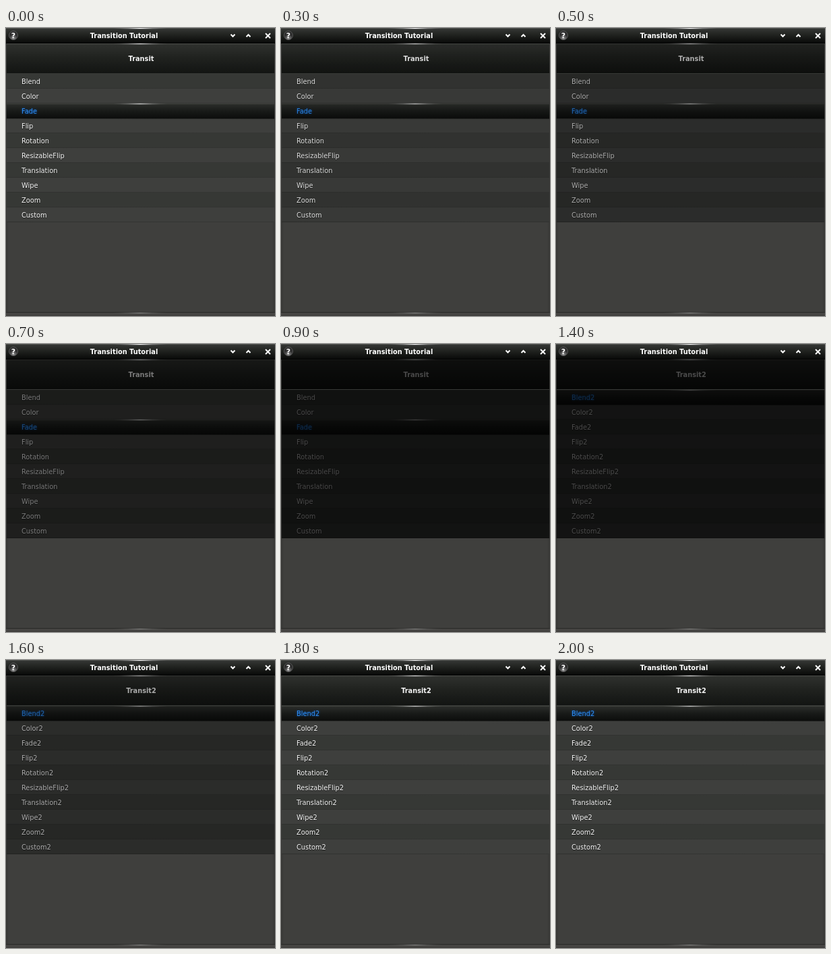
Animation of 399 by 427 pixels, one loop 2300 ms. Source, as an HTML page:

```html
<!DOCTYPE html>
<html lang="en">
<head>
<meta charset="utf-8">
<title>Transition Tutorial</title>
<style>
html, body { margin: 0; width: 100%; height: 100%; overflow: hidden; background: #3f3f3d; }
body { position: relative; font: 9.8px "DejaVu Sans", sans-serif; color: #f4f4f4; }
div, svg { position: absolute; box-sizing: border-box; }
#stage { inset: 0; width: 399px; height: 427px; overflow: hidden;
  background: linear-gradient(90deg, #353533, #3f3f3d 4px 395px, #353533); }
.title { left: 0; top: 0; width: 399px; height: 23px; line-height: 22px; padding-right: 49px;
  font-weight: bold; text-align: center; color: #fff;
  background: linear-gradient(#343634, #20221f 45%, #090a09);
  border-top: 1px solid #50524f; border-bottom: 1px solid #030303; }
.page { left: 1px; top: 23px; width: 397px; height: 265px; }
.header { left: 0; top: 0; width: 100%; height: 45px; line-height: 43px;
  font-weight: bold; text-align: center; padding-left: 2px;
  background: linear-gradient(#2f312e, #20221f 45%, #121412); border-top: 1px solid #4b4d49; }
.row { left: 0; width: 100%; height: 22px; line-height: 24px; padding-left: 22px;
  background: #3e3f3d; text-shadow: 0 1px 1px #0008; }
.row.dark { background: #363835; }
.row::after { content: ""; position: absolute; left: 0; bottom: 0; width: 100%; height: 1px;
  background: linear-gradient(90deg, #30312f, #30312f88); }
.row.on { z-index: 1; height: 23px; line-height: 22px; color: #2f8ff5; text-shadow: 0 0 3px #0a58b8;
  background: linear-gradient(#2b2d2a, #171917 50%, #0b0c0b); border-top: 1px solid #40423e; }
.glow { z-index: 2; left: 159px; width: 80px; height: 3px;
  background: radial-gradient(closest-side, #fff, #aaa8 45%, #0000); }
#shade { z-index: 3; left: 1px; top: 23px; width: 397px; height: 265px; background: #000; }
.rule { z-index: 4; left: 1px; top: 67px; width: 397px; height: 1px; background: #373936; }
.foot { left: 0; top: 421px; width: 399px; height: 6px;
  background: linear-gradient(#2d2d2b 1px, #4c4b49 2px, #3c3b39); }
</style>
</head>
<body>
<div id="stage">
  <div class="foot"></div>
  <div id="pages"></div>
  <div id="shade"></div>
  <div class="rule"></div>
  <div class="title">Transition Tutorial</div>
  <div class="glow" style="top:-1px"></div>
  <div class="glow" style="top:22px;opacity:.8"></div>
  <div class="glow" style="top:421px;opacity:.35"></div>
  <svg width="399" height="23" fill="none" stroke="#fff" stroke-width="2">
    <defs><radialGradient id="ball" cy=".85">
      <stop stop-color="#999"/><stop offset="1" stop-color="#2b2b2b"/>
    </radialGradient></defs>
    <circle cx="11" cy="11" r="6.5" fill="url(#ball)" stroke="#555" stroke-width="1"/>
    <text x="11" y="15" text-anchor="middle" font-size="11" font-weight="bold" fill="#fff" stroke="none">?</text>
    <path d="M333.5 9.5l3 3 3-3M356.5 13l3-3 3 3M385 8l7 7M392 8l-7 7"/>
  </svg>
</div>
<script>
const LOOP = 2300, HOLD = 300, STEP = 100, SWAP = 10, LAST = 18;
const items = ["Blend", "Color", "Fade", "Flip", "Rotation", "ResizableFlip",
  "Translation", "Wipe", "Zoom", "Custom"];
const shade = document.getElementById("shade");

function add(parent, className, text = "") {
  const el = document.createElement("div");
  el.className = className;
  el.textContent = text;
  parent.append(el);
  return el;
}

function makePage(suffix, selected) {
  const page = add(document.getElementById("pages"), "page");
  add(page, "header", "Transit" + suffix);
  items.forEach((name, i) => {
    const kind = i === selected ? " on" : i % 2 ? "" : " dark";
    add(page, "row" + kind, name + suffix).style.top = 45 + 22 * i + "px";
  });
  add(page, "glow").style.cssText = `left:158px;top:${44 + 22 * selected}px;opacity:.75`;
  return page;
}

const pages = [makePage("", 2), makePage("2", 0)];

function draw(now) {
  const t = now % LOOP;
  const step = Math.max(0, Math.min(LAST, Math.floor((t - HOLD) / STEP) + 1));
  const second = step >= SWAP;
  const light = second
    ? Math.min(1, Math.max(0.03, (step - SWAP - 0.4) / 5.2))
    : 1 - step / SWAP;
  pages[0].style.display = second ? "none" : "";
  pages[1].style.display = second ? "" : "none";
  shade.style.opacity = 1 - light;
  requestAnimationFrame(draw);
}
draw(performance.now());
</script>
</body>
</html>
```
